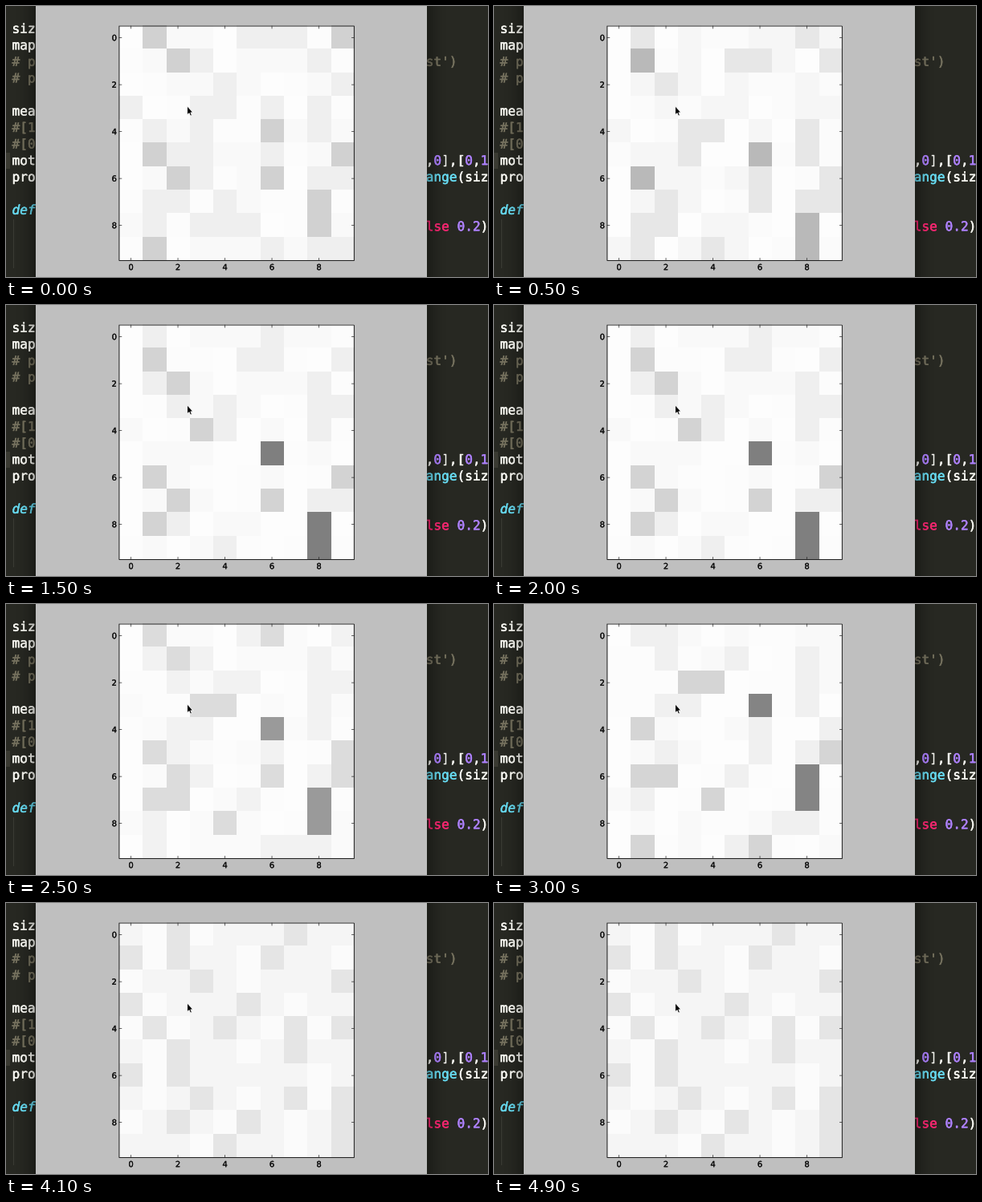
Recreate the animation shown at these times as a matplotlib script. Size 600 px wide and 338 px high, loop 5 s.

```python
import numpy as np
import matplotlib.pyplot as plt
from matplotlib.animation import FuncAnimation
from matplotlib.colors import LinearSegmentedColormap
from matplotlib.patches import Polygon, Rectangle
from matplotlib.patheffects import Normal, Stroke

W, H, DPI = 600, 338, 100
FRAME_MS, FRAMES = 100, 50
LEFT, TOP, SIDE = 140.9, 25.0, 292.5
CELL = SIDE / 10
WINDOW_LEFT, WINDOW_RIGHT = 37, 524

WORLD = np.array([list(row) for row in (
    "oxoxxxxooo", "oxoooxooox", "xxxooxxxxo", "oxxxxooxxx", "xoxxooxoxo",
    "oxoooxxooo", "oxooooooxx", "oxxooxxoxo", "xxooxooxxo", "oooxoooxxo")])
READINGS = "xoooxxxoxo"
STAY, UP, DOWN, RIGHT_STEP, LEFT_STEP = (0, 0), (-1, 0), (1, 0), (0, 1), (0, -1)
MOTIONS = [RIGHT_STEP, STAY, UP, LEFT_STEP, DOWN, LEFT_STEP, RIGHT_STEP, UP, UP, DOWN]
HIT, MISS = 0.6, 0.2


def localize():
    """Belief after every sense-and-move step of a histogram filter."""
    belief = np.full(WORLD.shape, 1 / WORLD.size)
    history = [belief]
    for reading, motion in zip(READINGS, MOTIONS):
        belief = belief * np.where(WORLD == reading, HIT, MISS)
        belief = np.roll(belief / belief.sum(), motion, axis=(0, 1))
        history.append(belief)
    return history


BELIEFS = localize()
# (start in ms, filter step on show)
SCHEDULE = [(0, 4), (200, 5), (900, 6), (1500, 7), (2200, 8),
            (2800, 9), (3500, 10), (4100, 2)]

fig = plt.figure(figsize=(W / DPI, H / DPI), dpi=DPI, facecolor="#272822")
ax = fig.add_axes([0, 0, 1, 1])
ax.axis("off")

# Code editor behind the window
WHITE, GREY, CYAN, PINK, PURPLE = "#f8f8f2", "#75715e", "#66d9ef", "#f92672", "#ae81ff"
CHAR, LINE = 9.72, 20.55


def code(line, col, text, color=WHITE, style="normal"):
    ax.text(7.5 + col * CHAR, 33.7 + line * LINE, text, color=color, style=style,
            family="DejaVu Sans Mono", size=16.15 * 72 / DPI, va="baseline", zorder=1,
            path_effects=[Stroke(linewidth=0.35, foreground=color), Normal()])


for line, text in [(0, "siz"), (1, "map"), (5, "mea"), (8, "mot"), (9, "pro")]:
    code(line, 0, text)
for line, text in [(2, "# p"), (3, "# p"), (6, "#[1"), (7, "#[0")]:
    code(line, 0, text, GREY)
code(2, 53, "st')", GREY)
for i, char in enumerate(",0],[0,1"):
    code(8, 53 + i, char, PURPLE if char.isdigit() else WHITE)
code(9, 53, "ange", CYAN)
code(9, 57, "(siz")
code(11, 0, "def", CYAN, "italic")
code(12, 53, "lse", PINK)
code(12, 57, "0.2", PURPLE)
code(12, 60, ")")
ax.add_patch(Rectangle((0, 183), 5, 20, color="#3a3a32", lw=0))
ax.plot([8.5, 8.5], [266, 326], color="#3b3c35", lw=0.7)

# Plot window with a soft shadow
shadow = np.zeros((1, 28, 4))
shadow[0, :, 3] = 0.3 * np.linspace(1, 0, 28) ** 2
for start, end in [(WINDOW_LEFT, WINDOW_LEFT - 28), (WINDOW_RIGHT, WINDOW_RIGHT + 28)]:
    pixels = shadow if end > start else shadow[:, ::-1]
    ax.imshow(pixels, extent=(min(start, end), max(start, end), H, 0),
              aspect="auto", zorder=1.5)
ax.add_patch(Rectangle((WINDOW_LEFT, -2), WINDOW_RIGHT - WINDOW_LEFT, H + 4,
                       color="#bfbfbf", lw=0, zorder=2))
shades = LinearSegmentedColormap.from_list("shades", ["#fdfdfd", "black"])
image = ax.imshow(BELIEFS[4], cmap=shades, vmin=0, vmax=0.231, zorder=3,
                  interpolation="nearest", aspect="auto",
                  extent=(LEFT, LEFT + SIDE, TOP + SIDE, TOP))
ax.add_patch(Rectangle((LEFT, TOP), SIDE, SIDE, fill=False, ec="#222222", lw=0.75,
                       snap=False, zorder=4))


def tick(x, y, dx, dy):
    ax.plot([x, x + dx], [y, y + dy], color="#222222", lw=0.5, snap=False, zorder=4)


label = dict(family="DejaVu Sans", size=10 * 72 / DPI, color="#111111", zorder=4,
             path_effects=[Stroke(linewidth=0.2, foreground="#111111"), Normal()])
for n in range(0, 10, 2):
    offset = (n + 0.5) * CELL
    x, y = LEFT + offset, TOP + offset
    tick(x, TOP, 0, 3)
    tick(x, TOP + SIDE, 0, -3)
    tick(LEFT, y, 3, 0)
    tick(LEFT + SIDE, y, -3, 0)
    ax.text(x, 329.2, str(n), ha="center", va="baseline", **label)
    ax.text(LEFT - 3, y + 3.6, str(n), ha="right", va="baseline", **label)

# Mouse pointer
arrow = np.array([(0, 0), (0, 11), (2.4, 8.8), (4, 12.4), (5.8, 11.6),
                  (4.3, 8.1), (7.4, 8.1)])
ax.add_patch(Polygon(arrow + (225.6, 124.8), fc="black", ec="white", lw=0.6, zorder=5))

ax.set_xlim(0, W)
ax.set_ylim(H, 0)


def update(frame):
    now = frame * FRAME_MS
    step = [s for start, s in SCHEDULE if start <= now][-1]
    image.set_data(BELIEFS[step])
    return [image]


anim = FuncAnimation(fig, update, frames=FRAMES, interval=FRAME_MS,
                     repeat=True, repeat_delay=0)
plt.show()
```
